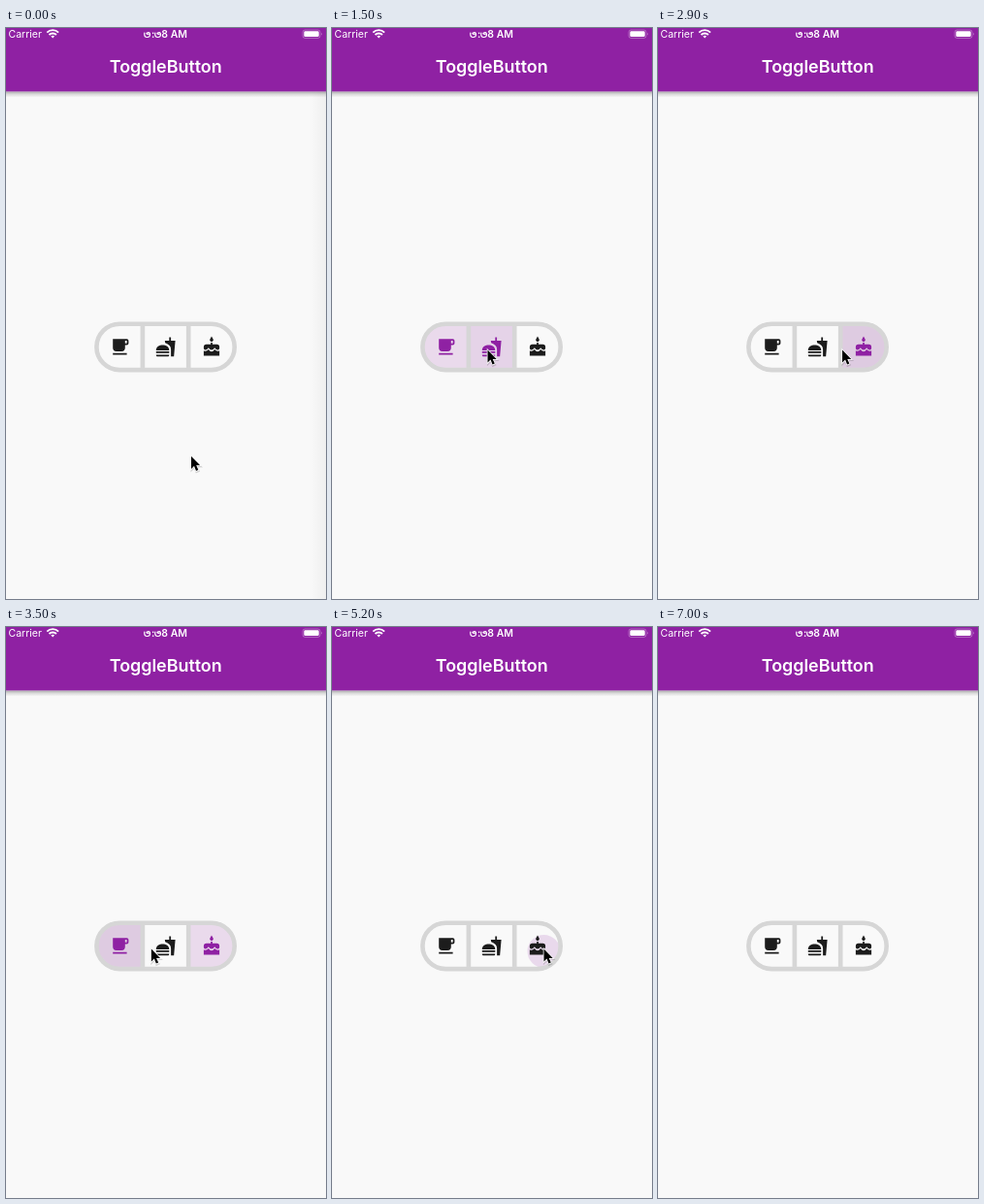
An HTML page for the animation above (7.7 s loop, 330 by 588 pixels).

```html
<!DOCTYPE html>
<html lang="en">
<head>
<meta charset="utf-8">
<title>ToggleButton</title>
<style>
html, body { margin: 0; width: 100%; height: 100%; overflow: hidden; background: #f9f9f9; }
svg { display: block; width: 330px; height: 588px; }
text { font-family: Inter, "Liberation Sans", sans-serif; font-size: 10.5px; fill: #fff; }
</style>
</head>
<body>
<svg viewBox="0 0 330 588">
  <defs>
    <linearGradient id="drop" x2="0" y2="1">
      <stop stop-opacity=".32"/>
      <stop offset=".45" stop-opacity=".13"/>
      <stop offset="1" stop-opacity="0"/>
    </linearGradient>
    <linearGradient id="side">
      <stop stop-opacity="0"/>
      <stop offset="1" stop-opacity=".04"/>
    </linearGradient>
    <rect id="outline" x="93.4" y="304.7" width="142.3" height="47.4" rx="23.7"/>
    <clipPath id="pill"><use href="#outline"/></clipPath>
    <path id="digit" d="M.8 2Q.2 6.5 3.5 6.5T6.4 3Q5.5.8 3.6 2T5 3.4" fill="none" stroke="#fff" stroke-width="1.2" stroke-linecap="round"/>
    <path id="arrow" d="M0 0V13L3 10L5 15L7.3 14L5.2 9.3H9.2Z"/>
  </defs>
  <rect width="330" height="588" fill="#f9f9f9"/>
  <rect id="edge" x="313" y="65" width="17" height="523" fill="url(#side)"/>
  <rect y="65.4" width="330" height="6" fill="url(#drop)"/>
  <rect width="330" height="65.4" fill="#8f21a3"/>

  <text x="2.5" y="10">Carrier</text>
  <path d="M42.3 4.6a8.3 8.3 0 0 1 11.8 0M44.5 7a5.2 5.2 0 0 1 7.4 0" fill="none" stroke="#fff" stroke-width="1.9"/>
  <path d="M46.4 8.6a2.6 2.6 0 0 1 3.6 0L48.2 10.6z" fill="#fff"/>
  <use href="#digit" x="142" y="3"/>
  <text x="150" y="10" font-weight="600">:</text>
  <use href="#digit" x="153" y="3"/>
  <text x="160.3" y="10" font-weight="600">8 AM</text>
  <rect x="306" y="2" width="18" height="8.4" rx="2.4" fill="none" stroke="#fff" stroke-opacity=".35" stroke-width=".9"/>
  <rect x="307.3" y="3.3" width="15.4" height="5.8" rx="1.4" fill="#fff"/>
  <path d="M325.2 4.8q1.5 1.4 0 2.8z" fill="#fff" fill-opacity=".5"/>
  <text x="164.7" y="46" style="font-size:17.9px" font-weight="600" text-anchor="middle">ToggleButton</text>

  <g id="cells" clip-path="url(#pill)"></g>
  <g fill="none" stroke="#d6d6d6" stroke-width="4.6">
    <path d="M140.9 304V353M188.2 304V353"/>
    <use href="#outline"/>
  </g>
  <g id="cursor">
    <use href="#arrow" x=".4" y="1.2" opacity=".15" stroke="#000" stroke-width="2"/>
    <use href="#arrow" stroke="#fff" stroke-width="1.5" paint-order="stroke"/>
  </g>
</svg>
<script>
const LOOP = 7700, STEP = 100, PITCH = 47.3, PURPLE = '#8f21a3';
const icons = [
  // cup, burger with drink, cake
  'M4 3H20Q22 3 22 5V8Q22 10 20 10H18V13Q18 17 14 17H8Q4 17 4 13ZM18 5V8H20V5ZM4 19H20V21H4Z',
  'M1 16C1 8 16 8 16 16ZM1 17H16V19H1ZM1 21H16Q16 23 15 23H2Q1 23 1 21ZM11 5H16V1H18V5H23L21.4 23H18V15Q18 9.5 11.4 7.4Z',
  'M12 0L13.7 3A2 2 0 1 1 10.3 3ZM3 14V12Q3 9 6 9H11V7H13V9H18Q21 9 21 12V14Q19 17.5 15.5 13Q12 18 8.5 13Q5 17.5 3 14ZM3 16.4Q6 18 8.5 15Q12 20 15.5 15Q18 18 21 16.4V22H3Z'
];

// The pointer taps the cells in a repeating order
const order = [0, 1, 0, 1, 2], tapX = [118, 160.5, 218.5], tapY = 331.6;
const taps = [800, 1300, 1900, 2400, 2800, 3400, 3700, 4000, 4600, 5200]
  .map((time, n) => {
    const cell = order[n % order.length];
    return { time, cell, x: tapX[cell], y: tapY };
  });
const EXIT = 5400, PACE = 4.7; // ms per pixel
const stops = [{ time: 0, x: 191, y: 441 }, ...taps, { time: EXIT, x: 269, y: 411 }];

const $ = id => document.getElementById(id);
const set = (el, attrs) => { for (const k in attrs) el.setAttribute(k, attrs[k]); };
function add(tag, attrs, parent) {
  const el = document.createElementNS('http://www.w3.org/2000/svg', tag);
  set(el, attrs);
  return parent.appendChild(el);
}

const cells = icons.map((d, i) => {
  const box = { x: 93.6 + i * PITCH, y: 304, width: PITCH, height: 49 };
  add('rect', box, add('clipPath', { id: 'cell' + i }, $('cells')));
  return {
    fill: add('rect', box, $('cells')),
    ink: add('circle', { 'clip-path': `url(#cell${i})` }, $('cells')),
    icon: add('path', {
      d, 'fill-rule': 'evenodd',
      transform: `translate(${117.4 + i * PITCH} 328.4) scale(.9) translate(-12 -12)`
    }, $('cells'))
  };
});

// Glides at a steady pace, easing out one step before the next tap
function pointer(t) {
  const n = stops.findIndex(s => s.time > t);
  if (n < 0) return stops.at(-1);
  const a = stops[n - 1], b = stops[n], end = b.time - STEP;
  const begin = Math.max(a.time, end - PACE * Math.hypot(b.x - a.x, b.y - a.y));
  const u = Math.min(1, Math.max(0, (t - begin) / (end - begin)));
  const e = u * (2 - u);
  return { x: a.x + (b.x - a.x) * e, y: a.y + (b.y - a.y) * e };
}

function draw(t) {
  cells.forEach(({ fill, ink, icon }, i) => {
    const past = taps.filter(p => p.cell === i && p.time <= t);
    const on = past.length % 2;
    set(fill, { fill: on ? '#eadaec' : '#f9f9f9' });
    set(icon, { fill: on ? PURPLE : '#1c1c1c' });
    // The ripple grows to fill the cell while fading
    const age = past.length ? (t - past.at(-1).time) / STEP : 3;
    set(ink, {
      cx: tapX[i], cy: tapY + 2.5, r: 17 + 50 * age,
      fill: age ? '#6d3b76' : PURPLE, 'fill-opacity': Math.max(0, .15 - .055 * age) * (age < 3)
    });
  });
  const { x, y } = pointer(t);
  set($('cursor'), { transform: `translate(${x} ${y})`, visibility: t < EXIT ? 'visible' : 'hidden' });
  set($('edge'), { visibility: t < STEP ? 'visible' : 'hidden' });
}

const start = performance.now();
function tick() {
  const t = (performance.now() - start) % LOOP;
  draw(Math.floor(t / STEP) * STEP);
  requestAnimationFrame(tick);
}
tick();
</script>
</body>
</html>
```
